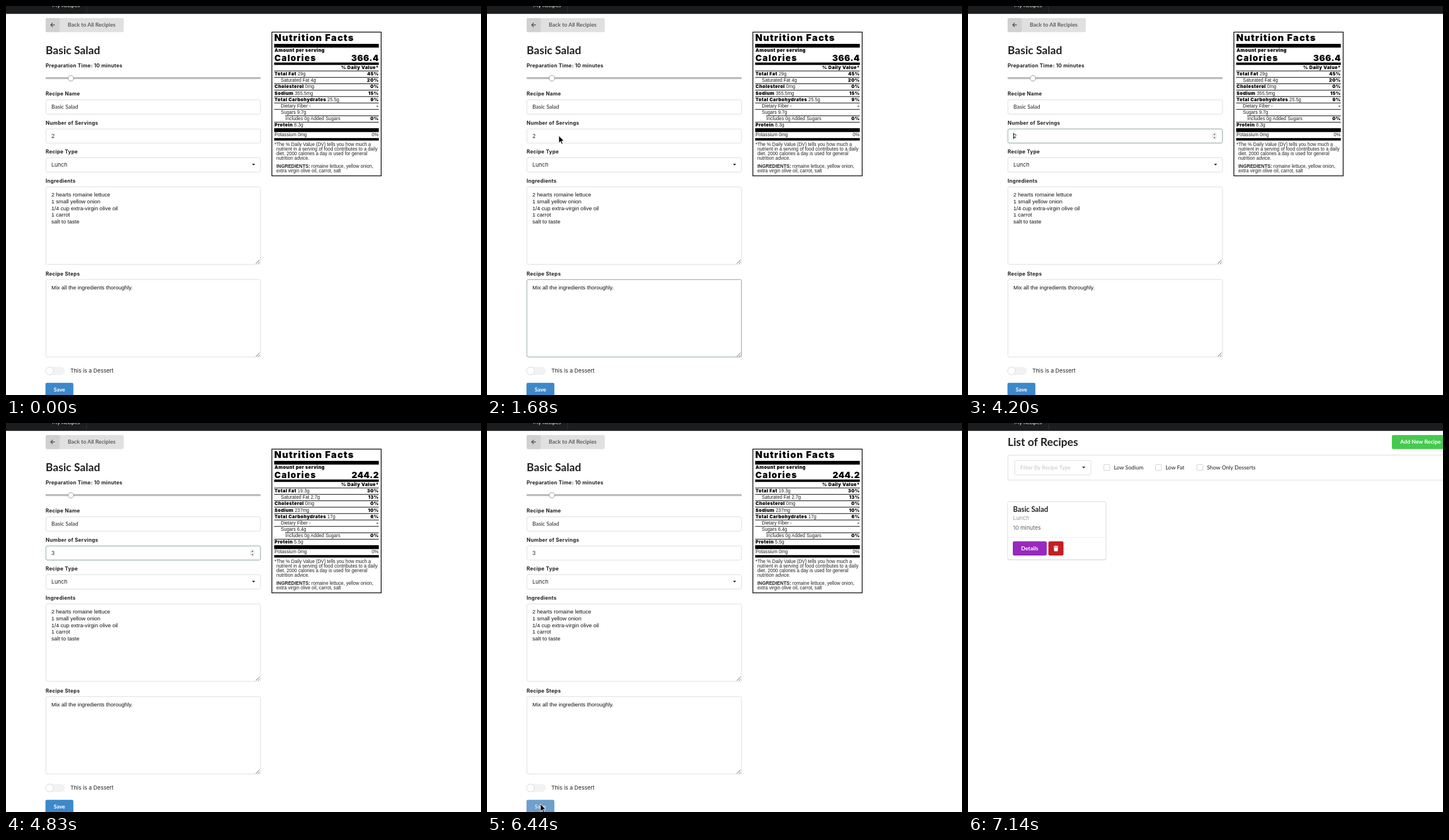
These frames come from a looping animation (827 px wide and 678 px high, 8120 ms). An HTML page:

```html
<!DOCTYPE html>
<html lang="en">
<head>
<meta charset="utf-8">
<title>Recipe editor</title>
<style>
  html, body { margin: 0; width: 100%; height: 100%; overflow: hidden; background: #fff; }
  svg { display: block; width: 827px; height: 678px; }
  text { font: 9.6px Lato, sans-serif; fill: #222; white-space: pre; }
  .bold { font-weight: 700; }
  .h1 { font-size: 19.2px; font-weight: 700; }
  .h3 { font-size: 12.3px; font-weight: 700; }
  .label { font: 700 8.9px Inter, sans-serif; letter-spacing: .03em; }
  .inter { font-family: Inter, sans-serif; }
  .area { font: 9.55px "Liberation Sans", Arial, sans-serif; fill: #111; }
  .fact { font: 8.2px "Liberation Sans", Arial, sans-serif; }
  .heavy { font: 900 8px Inter, sans-serif; letter-spacing: .05em; fill: #000; }
  .big { font-size: 15px; letter-spacing: .03em; }
  .wide { letter-spacing: .085em; }
  .title { font-size: 16.2px; letter-spacing: .075em; }
  .end { text-anchor: end; }
  .white { fill: #fff; }
  .dim { fill: #5f5f5f; }
  .soft { fill: #999; }
  .hint { fill: #c6c6c6; }
  .box { fill: #fff; stroke: #dcdcdd; }
  .focus { fill: none; stroke: #93aaaa; }
</style>
</head>
<body>
<svg id="stage" viewBox="0 0 827 678"></svg>
<script>
const LOOP = 8120, STEP = 70;

const text = (x, y, s, cls = '', id = '') => `<text x="${x}" y="${y}" class="${cls}" id="${id}">${s}</text>`;
const rect = (x, y, w, h, attrs = '') => `<rect x="${x}" y="${y}" width="${w}" height="${h}" ${attrs}/>`;
const path = (d, attrs = '') => `<path d="${d}" ${attrs}/>`;
const field = (y, h) => rect(69.5, y, 373.5, h, 'rx="2.5" class="box"');
const focusRing = (y, h, id = '') => rect(69.5, y, 373.5, h, `rx="2.5" class="focus" id="${id}"`);
const dropArrow = (x, y) => path(`M${x - 2.7} ${y - 1.4}h5.4l-2.7 3z`, 'fill="#222"');
const grip = y => path(`M435 ${y}l6.5-6.5M439 ${y}l2.5-2.5`, 'stroke="#555" stroke-width=".9"');
const caret = (id, x, y) => rect(x, y, 1, 11, `id="${id}"`);

// Nutrition rows: indent, bold name, plain name, amounts and percentages for 2 and 3 servings
const rows = [
  [0, 'Total Fat', '', ['29g', '19.3g'], ['45%', '30%']],
  [11, '', 'Saturated Fat', ['4g', '2.7g'], ['20%', '13%']],
  [0, 'Cholesterol', '', ['0mg', '0mg'], ['0%', '0%']],
  [0, 'Sodium', '', ['355.5mg', '237mg'], ['15%', '10%']],
  [0, 'Total Carbohydrates', '', ['25.5g', '17g'], ['9%', '6%']],
  [11, '', 'Dietary Fiber', ['-', '-'], ['-', '-']],
  [11, '', 'Sugars', ['9.7g', '6.4g'], ['', '']],
  [19, '', 'Includes', ['0g Added Sugars', '0g Added Sugars'], ['0%', '0%']],
  [0, 'Protein', '', ['8.3g', '5.5g'], ['', '']],
];

function nutrition(n) {
  const rule = (x, y, h) => rect(x, y, 649 - x, h);
  const table = rows.map(([indent, bold, plain, amount, percent], i) => {
    const y = 121 + i * 11.17;
    return rule(i === 7 ? 486 : 467, y - 8.3, 1) +
      text(467.5 + indent, y, `<tspan class="heavy">${bold}</tspan>${plain} ${amount[n]}`, 'fact') +
      text(649, y, percent[n], 'heavy end');
  }).join('');
  const notes = ['nutrient in a serving of food contributes to a daily',
    'diet. 2000 calories a day is used for general', 'nutrition advice.'];
  return rect(462.9, 45.5, 190.3, 250.5, 'fill="#fff" stroke="#000" stroke-width="1.3"') +
    text(467, 60.8, 'Nutrition Facts', 'heavy title') + rule(467, 66, 6.5) +
    text(467.5, 80, 'Amount per serving', 'heavy') +
    text(467.2, 95.5, 'Calories', 'heavy big wide') +
    text(649.3, 95.5, ['366.4', '244.2'][n], 'heavy big end') + rule(467, 98.5, 4.2) +
    text(649, 110, '% Daily Value*', 'heavy end') + table +
    rule(467, 213, 6.7) + text(467.5, 227.3, 'Potassium 0mg', 'fact') +
    text(648.5, 227.3, '0%', 'fact end') + rule(467, 230.2, 4.3) +
    text(467.5, 243.5, '*The % Daily Value (DV) tells you how much a', 'fact') +
    notes.map((s, i) => text(470.7, 251.8 + i * 8.3, s, 'fact')).join('') +
    text(470.7, 282, '<tspan class="bold">INGREDIENTS:</tspan> romaine lettuce, yellow onion,', 'fact') +
    text(470.7, 290, 'extra virgin olive oil, carrot, salt', 'fact');
}

function formPage() {
  const labels = [[107.3, 'Preparation Time: 10 minutes'], [156.3, 'Recipe Name'],
    [207.3, 'Number of Servings'], [257.3, 'Recipe Type'], [308.2, 'Ingredients'], [470, 'Recipe Steps']];
  const ingredients = ['2 hearts romaine lettuce', '1 small yellow onion',
    '1/4 cup extra-virgin olive oil', '1 carrot', 'salt to taste'];
  return rect(69, 21, 136, 24.5, 'rx="2.7" fill="#e0e0e0"') +
    rect(69, 21, 24.5, 24.5, 'rx="2.7" fill="#d1d1d1"') +
    path('M85 33h-7m3.4-3.6L77.8 33l3.6 3.6', 'fill="none" stroke="#555" stroke-width="1.4"') +
    text(107.5, 36.4, 'Back to All Recipies', 'bold dim') +
    text(69, 84, 'Basic Salad', 'h1') +
    labels.map(([y, s]) => text(69, y, s, 'label')).join('') +
    rect(69, 124.4, 374.4, 3.2, 'rx="1.2" fill="#c6c6c6"') + rect(69.2, 124.6, 374, 1, 'fill="#979797"') +
    '<circle cx="113" cy="126" r="4.8" fill="#fff" stroke="#999"/>' +
    field(163.5, 25) + text(79, 179, 'Basic Salad') +
    field(214.3, 24.6) + text(79, 230, '2', '', 'servings') +
    field(264.3, 25.2) + text(79, 280, 'Lunch', 'inter') + dropArrow(431, 276.3) +
    field(315.3, 135) + ingredients.map((s, i) => text(79, 331.8 + i * 11.85, s, 'area')).join('') + grip(449) +
    field(476.8, 135) + text(79, 493.5, 'Mix all the ingredients thoroughly.', 'area') + grip(611) +
    focusRing(476.8, 135, 'stepsFocus') +
    `<g id="servingsFocus">${focusRing(214.3, 24.6)}
      ${rect(425.5, 220.5, 7, 12, 'rx="3" fill="#f6f6f6" stroke="#ddd" stroke-width=".7"')}
      ${path('M427.2 224.7l1.8-2.4 1.8 2.4zM427.2 228.6l1.8 2.4 1.8-2.4z', 'fill="#555"')}</g>` +
    caret('stepsCaret', 221, 484.5) + caret('servingsCaret', 79, 221) +
    rect(69, 629, 33.5, 14, 'rx="7" fill="#f2f2f2"') +
    '<circle cx="75.8" cy="636" r="6.8" fill="#fff" stroke="#d8d8d8"/>' +
    text(112, 639.4, 'This is a Dessert', 'inter') +
    rect(68.7, 656.7, 48.6, 25, 'rx="2.7" id="save"') + text(83, 672.4, 'Save', 'bold white', 'saveText') +
    `<g id="facts0">${nutrition(0)}</g><g id="facts1">${nutrition(1)}</g>`;
}

function listPage() {
  const checks = [[236.5, 'Low Sodium'], [326.5, 'Low Fat'], [398.5, 'Show Only Desserts']];
  return text(69, 40.4, 'List of Recipes', 'h1') +
    rect(738, 21, 100, 24.5, 'rx="2.7" fill="#45ca4e"') + text(752.5, 36.4, 'Add New Recipe', 'bold white') +
    rect(69.5, 57, 800, 43, 'rx="2.7" fill="#e4e4e4"') + rect(69.5, 56, 800, 43.5, 'rx="2.7" class="box"') +
    rect(81.5, 65.3, 132.5, 25.2, 'rx="2.5" class="box"') +
    text(91, 81, 'Filter By Recipe Type', 'hint') + dropArrow(201.5, 77.3) +
    checks.map(([x, s]) => rect(x, 72.3, 10.5, 10.5, 'rx="1.8" class="box" style="stroke:#cfcfcf"') +
      text(x + 17.5, 81, s)).join('') +
    rect(69, 138, 171.5, 101.3, 'rx="3" fill="#d6d6d6"') + rect(69, 137, 171.3, 101.2, 'rx="3" class="box"') +
    text(78.5, 155.3, 'Basic Salad', 'h3') + text(78.5, 169, 'Lunch', 'inter soft') +
    text(78.5, 186.4, '10 minutes', 'inter dim') + rect(69.5, 199, 170.5, 1, 'fill="#eee"') +
    rect(78, 206.3, 59, 24.6, 'rx="2.7" fill="#9829be"') + text(92.5, 222.4, 'Details', 'bold white') +
    rect(140, 206.3, 26.3, 24.6, 'rx="2.7" fill="#c31f25"') +
    path('M149 214.6h2.6l.5-.9h2l.5.9h2.6v1.2H149zM149.5 216.6h7.2l-.5 6.8h-6.2z', 'fill="#fff"');
}

document.getElementById('stage').innerHTML =
  `<g id="form">${formPage()}</g><g id="list">${listPage()}</g>` +
  rect(0, 0, 827, 13.7, 'fill="#1b1c1d"') + rect(140, 0, 1, 13.7, 'fill="#303132"') +
  text(80.5, 2.4, 'My Recipes', 'white') +
  path('M0 0V12.8L2.9 10.1 5 14.8 7 13.9 5 9.3H9Z', 'id="arrow" stroke="#fff" stroke-width=".9"') +
  path('M-3-7Q0-7 0-5Q0-7 3-7M0-5V6M-3 8Q0 8 0 6Q0 8 3 8M-1.6 2.5H1.6',
    'id="beam" fill="none" stroke="#111" stroke-width="1.2"') +
  path('M-3 7V0Q-1.7-2-.5 0V4.5Q1 3.5 2 5Q3.5 4 4.5 5.5Q6.5 5 6.5 7V10L5 14H-2L-6 8.5Q-5.5 6-3 8ZM.7 9V12M2.8 9V12',
    'id="hand" fill="#fff" stroke="#111" stroke-width="1.1"');

const el = Object.fromEntries([...document.querySelectorAll('[id]')].map(e => [e.id, e]));
const show = (e, on) => { e.style.display = on ? '' : 'none'; };
const within = (t, ...spans) => spans.some(([a, b]) => t >= a && t < b);
const ramp = (t, start) => Math.max(0, Math.min(1, (t - start + STEP) / 210));

// Pointer stretches: shape, end time, then [time, x, y] points
const pointer = [
  ['arrow', 2030, [280, 350, 603], [490, 300, 480], [770, 175, 290], [1050, 126, 230],
    [1190, 124, 208], [1260, 125, 226], [1820, 125, 226], [2030, 112, 222]],
  ['beam', 4200, [2030, 112, 222], [2240, 103.5, 219], [3220, 103.5, 219], [3500, 118, 222]],
  ['arrow', 5670, [5320, 86, 480], [5390, 50, 592], [5530, 50, 592], [5670, 80, 645]],
  ['hand', 6300, [5670, 85, 650], [5740, 97, 659.5], [6300, 93, 664]],
  ['arrow', 7140, [6300, 93, 664], [6720, 93, 664], [6930, 255, 640], [7070, 421, 632]],
];

function movePointer(t) {
  const active = pointer.find(([, end, first]) => t >= first[0] && t < end);
  const [shape, , ...points] = active || [];
  for (const id of ['arrow', 'beam', 'hand']) show(el[id], id === shape);
  if (!active) return;
  const i = points.findLastIndex(p => p[0] <= t);
  const [t0, x0, y0] = points[i], [t1, x1, y1] = points[i + 1] || [t0 + 1, x0, y0];
  const k = (t - t0) / (t1 - t0);
  el[shape].setAttribute('transform', `translate(${x0 + (x1 - x0) * k} ${y0 + (y1 - y0) * k})`);
}

function draw(now) {
  const t = Math.floor(now % LOOP / STEP) * STEP;
  const onList = t >= 6510, edited = t >= 4270, updated = t >= 4340, saving = t >= 6300;
  show(el.form, !onList);
  show(el.list, onList);
  show(el.facts0, !updated);
  show(el.facts1, updated);
  el.servings.textContent = edited ? 3 : 2;
  el.stepsFocus.setAttribute('opacity', ramp(t, 1120) - ramp(t, 1890));
  el.servingsFocus.setAttribute('opacity', ramp(t, 1890) - ramp(t, 6020));
  show(el.stepsCaret, within(t, [1190, 1680]));
  show(el.servingsCaret, within(t, [2100, 2590], [3150, 3640], [4200, 4830], [5390, 5880]));
  el.servingsCaret.setAttribute('x', edited ? 84.5 : 79);
  el.save.setAttribute('fill', saving ? '#6f9fca' : t >= 5670 ? '#327fc3' : '#3d88cb');
  el.saveText.setAttribute('opacity', saving ? .75 : 1);
  movePointer(t);
  requestAnimationFrame(draw);
}
requestAnimationFrame(draw);
</script>
</body>
</html>
```
